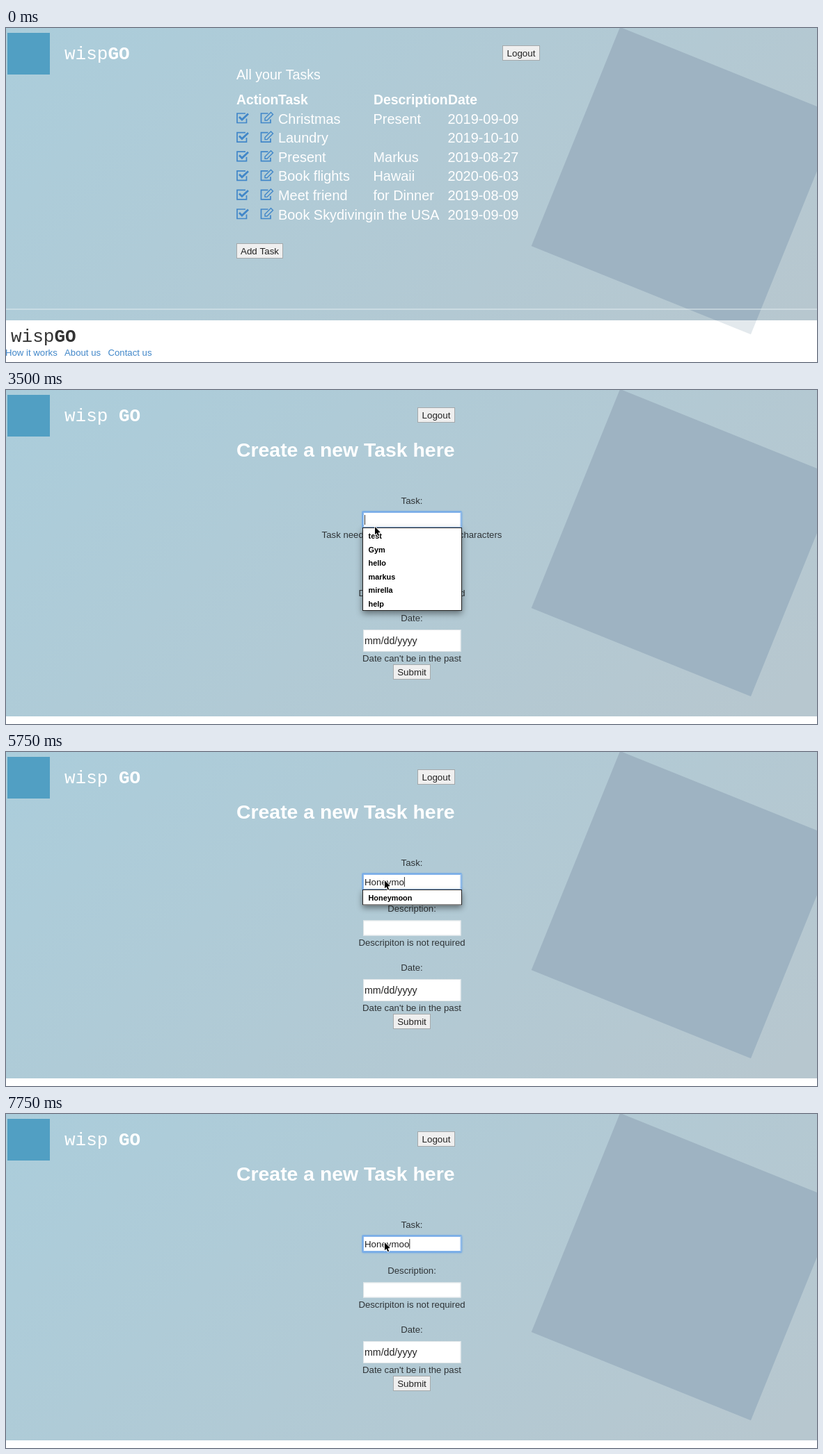
Write an HTML page with a canvas that moves like this. It is 1165 px wide and 481 px high and loops after 8 s.

```html
<!DOCTYPE html>
<html lang="en">
<head>
<meta charset="utf-8">
<title>Task list</title>
<style>
html, body { margin: 0; width: 100%; height: 100%; overflow: hidden; background: #fff; }
canvas { display: block; width: 100%; height: 100%; }
</style>
</head>
<body>
<canvas id="stage" width="1165" height="481"></canvas>
<script>
const ctx = document.getElementById('stage').getContext('2d');
const W = 1165, H = 481, LOOP = 8000, TICK = 250;
const SANS = '"Liberation Sans", Arial, sans-serif';
const MONO = '"Liberation Mono", monospace';
const DARK = '#2f3437', BLUE = '#4187c9', MID = 583;

const tasks = [
  ['Christmas', 'Present', '2019-09-09'],
  ['Laundry', '', '2019-10-10'],
  ['Present', 'Markus', '2019-08-27'],
  ['Book flights', 'Hawaii', '2020-06-03'],
  ['Meet friend', 'for Dinner', '2019-08-09'],
  ['Book Skydiving', 'in the USA', '2019-09-09']
];
const history = ['test', 'Gym', 'hello', 'markus', 'mirella', 'help', 'Honeymoon'];

// Pointer waypoints: tick, x, y
const route = [
  [3, 549, 160], [5, 455, 246], [7, 384, 308], [8, 378, 319], [10, 378, 319],
  [12, 498, 224], [13, 529, 198], [14, 530, 197], [17, 544, 185]
];

function rect(x, y, w, h, fill, stroke) {
  ctx.fillStyle = fill;
  ctx.fillRect(x, y, w, h);
  if (stroke) {
    ctx.strokeStyle = stroke;
    ctx.lineWidth = 1;
    ctx.strokeRect(x + 0.5, y + 0.5, w - 1, h - 1);
  }
}

function text(str, x, y, size, color, { bold = false, align = 'left', family = SANS } = {}) {
  ctx.font = `${bold ? 'bold ' : ''}${size}px ${family}`;
  ctx.textAlign = align;
  ctx.fillStyle = color;
  ctx.fillText(str, x, y);
  return ctx.measureText(str).width;
}

function line(points, width, color, close) {
  ctx.beginPath();
  points.forEach(([x, y]) => ctx.lineTo(x, y));
  if (close) ctx.closePath();
  ctx.lineWidth = width;
  ctx.strokeStyle = color;
  ctx.stroke();
}

function button(label, x, y, w) {
  rect(x, y, w, 22, '#efefef', '#a5a9ab');
  text(label, x + w / 2, y + 15.5, 13.4, '#222', { align: 'center' });
}

function brand(gap, x, y, color) {
  const w = text('wisp' + gap, x, y, 26, color, { family: MONO });
  text('GO', x + w, y, 26, color, { bold: true, family: MONO });
}

function bigSquare(color) {
  ctx.save();
  ctx.translate(976, 220);
  ctx.rotate(22 * Math.PI / 180);
  rect(-170, -170, 340, 340, color);
  ctx.restore();
}

function backdrop(bottom) {
  rect(0, 0, W, H, '#fff');
  bigSquare('#e3e9ed');
  ctx.save();
  ctx.beginPath();
  ctx.rect(0, 0, W, bottom);
  ctx.clip();
  const g = ctx.createLinearGradient(150, -150, 950, 620);
  g.addColorStop(0, '#abcddb');
  g.addColorStop(1, '#b7c7cf');
  rect(0, 0, W, bottom, g);
  bigSquare('#9eb3c2');
  ctx.restore();
  rect(2, 7, 61, 60, '#519fc3');
}

function checkIcon(x, y) {
  line([[x + 14.5, y + 9], [x + 14.5, y + 15], [x + 1, y + 15], [x + 1, y + 1.5], [x + 13, y + 1.5]], 1.7, BLUE);
  line([[x + 4, y + 6.5], [x + 8, y + 10.5], [x + 17, y + 2]], 2.8, BLUE);
}

function editIcon(x, y) {
  line([[x + 14.5, y + 10], [x + 14.5, y + 15], [x + 1, y + 15], [x + 1, y + 1.5], [x + 11, y + 1.5]], 1.7, BLUE);
  line([[x + 6.5, y + 8.5], [x + 15, y], [x + 18, y + 3], [x + 9.5, y + 11.5], [x + 6.5, y + 11.5]], 1.4, BLUE, true);
}

function listPage() {
  backdrop(421);
  brand('', 84, 45, '#fff');
  button('Logout', 713, 25, 54);
  text('All your Tasks', 331, 74, 19.6, '#fff');
  [['Action', 331], ['Task', 391], ['Description', 528], ['Date', 635]]
    .forEach(([label, x]) => text(label, x, 110, 19.4, '#fff', { bold: true }));
  tasks.forEach((row, i) => {
    const y = 137.5 + i * 27.6;
    checkIcon(331, y - 16);
    editIcon(365.5, y - 16);
    [391, 527.5, 634.5].forEach((x, col) => text(row[col], x, y, 19.9, '#fff'));
  });
  button('Add Task', 331, 310, 67);
  rect(0, 404.5, W, 1, '#e3edf1');
  brand('', 7, 451.5, '#333');
  [['How it works', -1], ['About us', 84], ['Contact us', 146.5]]
    .forEach(([label, x]) => text(label, x, 472, 13.2, BLUE));
}

function input(y, h, value, focused, size = 13.3) {
  if (focused) {
    ctx.save();
    ctx.shadowColor = '#5b9be6';
    ctx.shadowBlur = 3;
    rect(511.5, y - 1.5, 143, h + 3, '#72aaea');
    ctx.restore();
  }
  rect(513, y, 140.5, h, '#fff', focused ? '#8fb9ea' : '#dde3e6');
  const w = text(value, 515, y + h / 2 + 4.7, size, '#222');
  if (focused) rect(515 + w, y + 4, 1, h - 8, '#333');
}

function suggestions(typed) {
  const items = history
    .filter(word => word.toLowerCase().startsWith(typed.toLowerCase()))
    .slice(0, 6);
  const h = items.length * 19.5 + 3;
  ctx.save();
  ctx.shadowColor = 'rgba(0,0,0,.45)';
  ctx.shadowBlur = 9;
  ctx.shadowOffsetY = 4;
  rect(512, 198, 143, h, '#fff');
  ctx.restore();
  rect(512, 198, 143, h, '#fff', '#222');
  items.forEach((word, i) => text(word, 520.5, 214 + i * 19.5, 10.9, '#000', { bold: true }));
}

function formPage(tick) {
  const count = tick < 18 ? 0 : tick === 18 ? 1 : tick === 19 ? 2 : Math.min(8, tick - 16);
  const typed = 'Honeymoon'.slice(0, count);
  const valid = count >= 3;
  const onDescription = tick >= 26 && tick < 28;
  const onTask = tick >= 14 && !onDescription;
  const up = valid ? 18 : 0;
  const label = (str, y) => text(str, MID, y, 13.2, DARK, { align: 'center' });

  backdrop(470);
  brand(' ', 84, 45, '#fff');
  button('Logout', 591, 25, 54);
  text('Create a new Task here', 331, 96, 28.4, '#fff', { bold: true });

  label('Task:', 163.5);
  input(176, 22, typed, onTask);
  if (!valid) label('Task needs to have at least three characters', 212.5);
  label('Description:', 248 - up);
  input(260.5 - up, 22, '', onDescription);
  label('Descripiton is not required', 297 - up);
  if (tick < 14) rect(568, 320, 27.5, 16, '#97c0ee');
  label('Date:', 332.5 - up);
  input(345 - up, 32, 'mm/dd/yyyy', false, 14.2);
  label("Date can't be in the past", 391 - up);
  button('Submit', 556, 395 - up, 54);
  if (tick >= 14 && tick < 25) suggestions(typed);
}

function pointer(tick) {
  if (tick < route[0][0]) return;
  const next = route.findIndex(p => p[0] > tick);
  let [, x, y] = route[next < 0 ? route.length - 1 : next - 1];
  if (next > 0) {
    const a = route[next - 1], b = route[next];
    const k = (tick - a[0]) / (b[0] - a[0]);
    x += (b[1] - a[1]) * k;
    y += (b[2] - a[2]) * k;
  }
  ctx.save();
  ctx.translate(x, y);
  line([[0, 0], [0, 11.2], [2.5, 9], [4.4, 13.2], [6.2, 12.4], [4.4, 8.4], [7.8, 8.1]], 1.6, '#fff', true);
  ctx.fillStyle = '#000';
  ctx.fill();
  ctx.restore();
}

function frame(now) {
  const tick = Math.floor((now % LOOP) / TICK);
  if (tick < 10) listPage();
  else formPage(tick);
  pointer(tick);
  requestAnimationFrame(frame);
}
requestAnimationFrame(frame);
</script>
</body>
</html>
```
